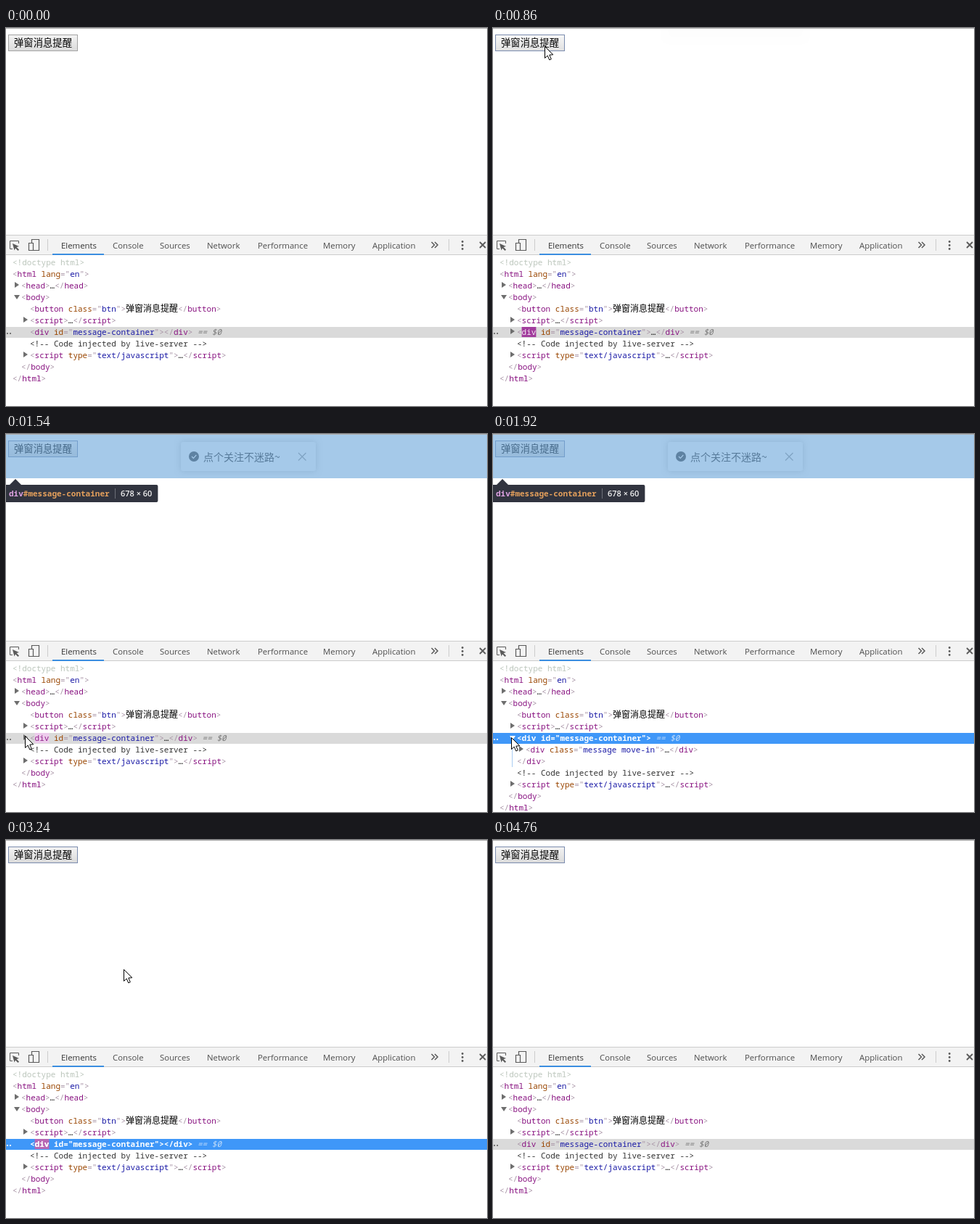
Recreate the animation shown at these times as an HTML page with a canvas. Size 663 by 521 pixels, loop 4.83 s.

```html
<!DOCTYPE html>
<html lang="zh">
<head>
<meta charset="utf-8">
<style>
html, body { margin: 0; width: 100%; height: 100%; overflow: hidden; background: #fff; }
canvas { display: block; }
</style>
</head>
<body>
<canvas id="stage" width="663" height="521"></canvas>
<script>
const ctx = document.getElementById('stage').getContext('2d', { alpha: false });
const LOOP = 4830;
const CJK = '"Noto Sans CJK SC", "Noto Sans CJK", sans-serif';
const MONO = '11px "Noto Sans Mono", "Noto Sans CJK SC", monospace';
const UI = '"Open Sans", sans-serif';
const LABEL = '弹窗消息提醒';

const T = {
  press: 640, release: 760, messageIn: 825, filled: 850, expand: 1660,
  messageOut: 2730, classChange: 2770, emptied: 3130, blur: 4760
};
const SLIDE = 300;

// Pointer path: time, x, y
const PATH = [
  [30, 562, 530], [530, 72, 25], [1090, 72, 25], [1240, 46, 369], [1300, 43, 386],
  [1590, 26, 418], [1960, 26, 418], [2170, 163, 178], [4180, 163, 178], [4450, 200, 530]
];

const clamp = v => Math.max(0, Math.min(1, v));
const smooth = v => (v = clamp(v), v * v * (3 - 2 * v));
const mix = (a, b, p) => a + (b - a) * p;

// cubic-bezier(0, 0, .2, 1)
function easeOut(x) {
  let lo = 0, hi = 1;
  for (let i = 0; i < 16; i++) {
    const s = (lo + hi) / 2;
    if (.6 * s * s * (1 - s) + s ** 3 < x) lo = s; else hi = s;
  }
  return 3 * lo * lo * (1 - lo) + lo ** 3;
}

function pointerAt(t) {
  const next = PATH.findIndex(k => k[0] > t);
  if (next === 0) return PATH[0].slice(1);
  if (next < 0) return PATH.at(-1).slice(1);
  const [a, b] = [PATH[next - 1], PATH[next]];
  const p = smooth((t - a[0]) / (b[0] - a[0]));
  return [mix(a[1], b[1], p), mix(a[2], b[2], p)];
}

function rect(x, y, w, h, color) {
  ctx.fillStyle = color;
  ctx.fillRect(x, y, w, h);
}

function text(str, x, y, font, color) {
  ctx.font = font;
  ctx.fillStyle = color;
  ctx.fillText(str, x, y);
  return ctx.measureText(str).width;
}

function shape(points, fill) {
  ctx.beginPath();
  points.forEach(([x, y]) => ctx.lineTo(x, y));
  ctx.closePath();
  ctx.fillStyle = fill;
  ctx.fill();
}

function stroke(d, color, width = 1) {
  ctx.strokeStyle = color;
  ctx.lineWidth = width;
  ctx.stroke(new Path2D(d));
}

function round(x, y, w, h, r, fill) {
  ctx.beginPath();
  ctx.roundRect(x, y, w, h, r);
  ctx.fillStyle = fill;
  ctx.fill();
}

function drawButton(t, [px, py]) {
  const pressed = t >= T.press && t < T.release;
  const hover = px > 2 && px < 99 && py > 9 && py < 32;
  const fill = ctx.createLinearGradient(0, 9, 0, 32);
  fill.addColorStop(0, pressed ? '#d8d8d8' : hover ? '#f8f8f8' : '#f4f4f4');
  fill.addColorStop(1, pressed ? '#eeeeee' : hover ? '#e0e0e0' : '#dadada');
  rect(3, 9, 96, 23, t >= T.press ? '#7b8cae' : '#a3a3a3');
  rect(4, 10, 94, 21, fill);
  text(LABEL, 11, 25, '13.333px ' + CJK, '#000');
}

function drawMessage(t, dimmed) {
  const shown = smooth((t - T.messageIn) / SLIDE) - smooth((t - T.messageOut) / SLIDE);
  if (shown <= 0) return;
  ctx.save();
  ctx.globalAlpha = shown;
  ctx.translate(0, -40 * (1 - shown));
  ctx.shadowColor = 'rgba(0,0,0,.22)';
  ctx.shadowBlur = 8;
  round(241, 11, 186, 40, 3, '#fff');
  ctx.shadowColor = 'transparent';
  round(252, 24, 14, 14, 7, dimmed ? '#444' : '#2fb344');
  stroke('M256 31l2.3 2.4 4-4.4', '#fff', 1.2);
  text('点个关注不迷路~', 272, 36.5, '14px ' + CJK, '#333');
  stroke('M403 26l10.5 10.5M413.5 26l-10.5 10.5', '#999', 1.1);
  ctx.restore();
}

function drawOverlay(el, t) {
  const boxHeight = t >= T.messageIn && t < T.messageOut + SLIDE ? 60 : 0;
  const boxes = {
    html: ['678 × 39', 0, 1, 663, 39],
    body: ['662 × 23', 3, 9, 660, 23],
    'button.btn': ['96 × 23', 3, 9, 96, 23],
    'div#message-container': ['678 × ' + boxHeight, 0, 1, 663, boxHeight]
  };
  if (!boxes[el]) return;
  const [size, x, y, w, h] = boxes[el];
  rect(x, y, w, h, 'rgba(111,168,220,.62)');
  let bottom = y + h;
  if (el === 'body') {
    const margin = 'rgba(246,178,107,.66)';
    rect(0, 1, 663, 8, margin);
    rect(0, 32, 663, 8, margin);
    rect(0, 9, 3, 23, margin);
    bottom = 40;
  }
  const top = bottom + 9, baseline = top + 16;
  const bold = 'bold ' + MONO, sizeFont = '600 11px ' + UI;
  const [tag] = el.split(/[.#]/);
  ctx.font = bold;
  const sep = Math.round(4 + ctx.measureText(el).width + 7);
  ctx.font = sizeFont;
  round(-3, top, sep + 8 + ctx.measureText(size).width + 11, 24, 2, '#31343f');
  shape([[5, top], [13, top - 8], [21, top]], '#31343f');
  const tagWidth = text(tag, 4, baseline, bold, '#e0a3e4');
  text(el.slice(tag.length), 4 + tagWidth, baseline, bold, '#e5a05c');
  rect(sep, top + 5, 1, 14, '#6d7078');
  text(size, sep + 8, baseline, sizeFont, '#f2f2f2');
}

function drawToolbar() {
  rect(0, 285, 663, 236, '#fff');
  rect(0, 285, 663, 28, '#ccc');
  rect(0, 286, 663, 26, '#f3f3f3');
  rect(64, 311, 71, 2, '#3b8ee0');
  const ink = '#5a5a5a';
  stroke('M9 304.5H5.5V293.5H17.5V297', ink);
  shape([[9, 297], [18, 301], [14.5, 302], [18, 305.5], [16.5, 307], [13, 303.5], [11.5, 306.5]], ink);
  stroke('M35.5 296V291.5H45.5V306.5H38M31.5 296.5H37.5V306.5H31.5Z', ink, 1.2);
  [57, 610].forEach(x => rect(x, 291, 1, 16, '#ccc'));
  const tabs = { Elements: 76, Console: 147, Sources: 212, Network: 277, Performance: 347, Memory: 437, Application: 505 };
  for (const name in tabs) text(name, tabs[name], 304, '11.4px ' + UI, name === 'Elements' ? '#333' : '#4d4d4d');
  stroke('M586.5 295l4 4-4 4M591 295l4 4-4 4', ink, 1.5);
  [294.5, 299.5, 304.5].forEach(y => round(627.8, y - 1.4, 2.8, 2.8, 1.4, ink));
  stroke('M653 295l8 8M661 295l-8 8', ink, 1.8);
}

// Each row: markup, x, arrow, element, extras
function treeRows(t) {
  const filled = t >= T.filled && t < T.emptied;
  const open = t >= T.expand && t < T.emptied;
  const box = 'div#message-container';
  const start = '<div id="message-container">';
  // Expanding the row cancels its running flash
  const flash = !open && { part: 'div', age: t - (filled ? T.filled : T.emptied) };
  const rows = [
    ['<!doctype html>', 9],
    ['<html lang="en">', 9, '', 'html'],
    ['<head>…</head>', 21, 'closed'],
    ['<body>', 21, 'open', 'body'],
    [`<button class="btn">${LABEL}</button>`, 33, '', 'button.btn'],
    ['<script>…<\/script>', 33, 'closed'],
    [start + (open ? '' : filled ? '…</div>' : '</div>') + ' == $0', 33,
      open ? 'open' : filled ? 'closed' : '', box, { selected: true, flash }]
  ];
  if (open) {
    const name = t < T.classChange ? 'message move-in' : 'message move-out';
    rows.push(
      [`<div class="${name}">…</div>`, 45, 'closed', '', { flash: { part: name, age: t - T.classChange } }],
      ['</div>', 33, '', box]);
  }
  rows.push(
    ['<!-- Code injected by live-server -->', 33],
    ['<script type="text/javascript">…<\/script>', 33, 'closed'],
    ['</body>', 21, '', 'body'],
    ['</html>', 9, '', 'html']);
  return rows;
}

// Returns how white the text above the flash should be
function drawFlash(x, baseline, age, width) {
  if (age < 0 || age > 1400) return 0;
  const p = easeOut(clamp(age / 1120));
  const channel = (a, b) => Math.round(mix(a, b, p));
  ctx.globalAlpha = 1 - easeOut(clamp((age - 1120) / 280));
  rect(x, baseline - 11, width, 14, `rgb(${channel(158, 245)},${channel(54, 219)},${channel(153, 244)})`);
  ctx.globalAlpha = 1;
  return 1 - p;
}

function drawMarkup(src, x, baseline, active, flash) {
  if (src.startsWith('<!')) {
    text(src, x, baseline, MONO, src[2] === '-' ? '#333' : '#bcc6bc');
    return;
  }
  let flashed = false;
  const put = (str, color, font = (active ? 'bold ' : '') + MONO) => {
    ctx.font = font;
    const width = ctx.measureText(str).width;
    const isFlash = flash && str === flash.part && !flashed;
    const glow = isFlash ? drawFlash(x, baseline, flash.age, width) : 0;
    flashed ||= isFlash;
    text(str, x, baseline, font, active ? '#fff' : color);
    if (glow) text(str, x, baseline, font, `rgba(255,255,255,${glow})`);
    x += width;
  };
  const tokens = /(<\/?)(\w+)|( \w+)(=")([^"]*)(")|>| == \$0|[^<> ]+/g;
  for (const m of src.matchAll(tokens)) {
    if (m[1]) {
      put(m[1], '#a894a6');
      put(m[2], '#881280');
    } else if (m[3]) {
      put(m[3], '#994500');
      put(m[4], '#a894a6');
      put(m[5], '#1a1aa6');
      put(m[6], '#a894a6');
    } else if (m[0] === '>') {
      put('>', '#a894a6');
    } else if (m[0].startsWith(' ==')) {
      text(m[0], x, baseline, 'italic ' + MONO, active ? '#c5def9' : '#777');
    } else {
      put(m[0], '#000', m[0] === LABEL ? '12px ' + CJK : MONO);
    }
  }
}

function drawTree(rows, hovered, t) {
  rows.forEach(([src, x, arrow, , extra = {}], i) => {
    const mid = 323 + i * 16;
    const active = extra.selected && t >= T.expand && t < T.blur;
    if (extra.selected) {
      rect(0, mid - 7, 663, 15, active ? '#3f97f8' : '#dadada');
      [2, 6].forEach(dot => rect(dot - 1, mid + 1, 2, 2, active ? '#fff' : '#777'));
    } else if (i === hovered) {
      rect(0, mid - 7, 663, 15, '#ebf1fb');
    }
    const color = active ? '#fff' : '#6e6e6e', ax = x - 9;
    if (arrow === 'closed') shape([[ax, mid - 5], [ax + 6, mid - 1], [ax, mid + 3]], color);
    if (arrow === 'open') shape([[ax - 1, mid - 3], [ax + 7, mid - 3], [ax + 3, mid + 3]], color);
    drawMarkup(src, x, mid + 4, active, extra.flash);
  });
  if (t >= T.expand && t < T.emptied) rect(26, 428, 1, 31, '#a9cdf3');
}

function drawPointer([x, y]) {
  ctx.save();
  ctx.translate(Math.round(x) - .5, Math.round(y) + .5);
  shape([[0, 0], [0, 16], [3.7, 12.6], [6.3, 18.5], [8.8, 17.4], [6.3, 11.6], [11.3, 11.3]], '#fff');
  ctx.strokeStyle = '#000';
  ctx.lineWidth = 1;
  ctx.stroke();
  ctx.restore();
}

function draw(t) {
  const pointer = pointerAt(t);
  const rows = treeRows(t);
  const rowAt = y => Math.floor((y - 315.5) / 16);
  // The page highlight trails the pointer slightly
  const marked = rows[rowAt(pointerAt(t - 30)[1])]?.[3];
  rect(0, 0, 663, 521, '#fff');
  drawButton(t, pointer);
  drawMessage(t, marked);
  if (marked) drawOverlay(marked, t);
  rect(0, 0, 663, 1, '#b0b0b0');
  drawToolbar();
  drawTree(rows, rowAt(pointer[1]), t);
  drawPointer(pointer);
}

function tick() {
  draw(performance.now() % LOOP);
  requestAnimationFrame(tick);
}
tick();
</script>
</body>
</html>
```
